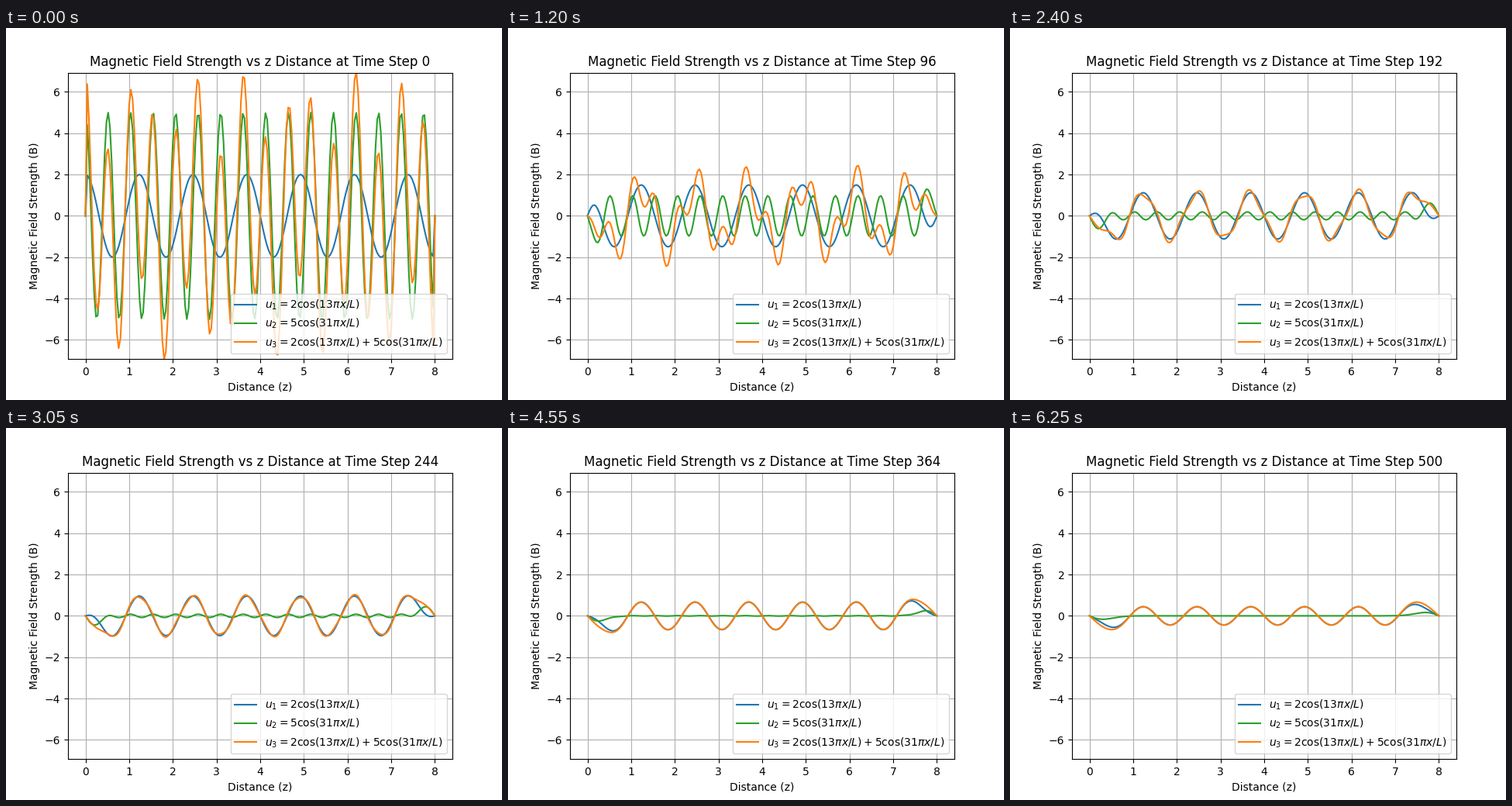
A matplotlib script that plays this animation: 640 by 480 pixels, repeating every 6.3 s.

```python
import numpy as np
import matplotlib.pyplot as plt
from matplotlib.animation import FuncAnimation

L = 8.0
CELLS = 200
FRAMES = 126
STEPS_PER_FRAME = 4
RATIO = 0.0725  # D * dt / dx**2

x = np.linspace(0, L, CELLS + 1)


def wave(amp, n):
    return amp * np.cos(n * np.pi * x / L)


def diffuse(u):
    """One explicit step; the fixed ends stay at zero."""
    new = u.copy()
    new[:, 1:-1] += RATIO * (u[:, 2:] - 2 * u[:, 1:-1] + u[:, :-2])
    return new


slow, fast = wave(2, 13), wave(5, 31)
u = np.array([slow, fast, slow + fast])
u[:, [0, -1]] = 0

history = [u]
for _ in range(STEPS_PER_FRAME * (FRAMES - 1)):
    history.append(diffuse(history[-1]))

fig, ax = plt.subplots(figsize=(6.4, 4.8), dpi=100)
styles = [
    ("tab:blue", r"$u_1 = 2\cos(13\pi x/L)$"),
    ("tab:green", r"$u_2 = 5\cos(31\pi x/L)$"),
    ("tab:orange", r"$u_3 = 2\cos(13\pi x/L) + 5\cos(31\pi x/L)$"),
]
lines = [ax.plot(x, row, color=color, label=label)[0]
         for row, (color, label) in zip(u, styles)]

ax.set_xlim(-0.05 * L, 1.05 * L)
ax.set_ylim(u.min(), u.max())
ax.set_xlabel("Distance (z)")
ax.set_ylabel("Magnetic Field Strength (B)")
ax.grid(True)
ax.legend(loc="lower right")
title = ax.set_title("")


def update(frame):
    step = frame * STEPS_PER_FRAME
    for line, row in zip(lines, history[step]):
        line.set_ydata(row)
    title.set_text(f"Magnetic Field Strength vs z Distance at Time Step {step}")
    return [*lines, title]


anim = FuncAnimation(fig, update, frames=FRAMES, interval=50,
                     repeat=True, repeat_delay=0, blit=False)
plt.show()
```
